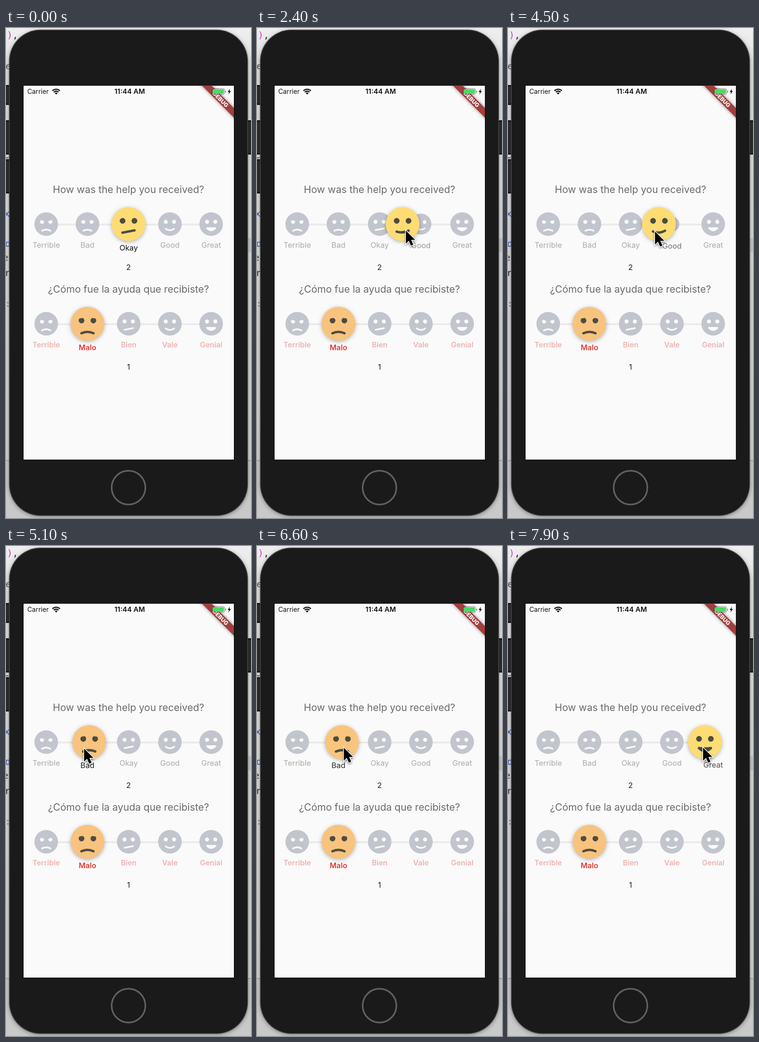
These frames come from a looping animation (530x1057 px, 8000 ms). An HTML page with a canvas:

```html
<!DOCTYPE html>
<html lang="en">
<head>
<meta charset="utf-8">
<title>Review sliders</title>
<style>
html, body { margin: 0; width: 530px; height: 1057px; overflow: hidden; }
canvas { display: block; }
</style>
</head>
<body>
<canvas id="stage" width="530" height="1057"></canvas>
<script>
const ctx = document.getElementById('stage').getContext('2d');
const LOOP = 8000, STEP = 100;
const FIRST = 87, GAP = 89.2;

// time, slider x, pointer x, pointer y
const KEYS = [
  [0, 265, 300, 545], [500, 265, 264, 438], [1300, 91, 89, 438], [1700, 91, 89, 438],
  [2400, 315, 322, 437], [3000, 420, 417, 440], [3500, 422, 418, 441], [3900, 422, 418, 441],
  [5100, 180, 169, 437], [5700, 91, 88, 438], [6000, 91, 89, 437], [6200, 91, 89, 437],
  [7100, 353, 361, 432], [7700, 423, 420, 435], [7900, 426, 422, 435]
];

// mouth: left end, right end, upper and lower control heights; eye: cut centre and half width
const MOODS = [
  { color: [239, 170, 136], mouth: [20.5, 20.5, 13.5, 13.5], cut: [-75, 50] },
  { color: [248, 195, 126], mouth: [20.5, 20.5, 14.5, 14.5], cut: [-100, 35] },
  { color: [254, 220, 116], mouth: [18.5, 13.5, 16, 16], cut: [-100, 0] },
  { color: [254, 220, 116], mouth: [14.5, 14.5, 24, 24], cut: [-100, 0] },
  { color: [254, 220, 116], mouth: [12.5, 12.5, 12.5, 26], cut: [-100, 0] }
];

const slotX = i => FIRST + GAP * i;
const mix = (a, b, f) => a.map((v, i) => v + (b[i] - v) * f);
const rad = deg => deg * Math.PI / 180;

function slope(i, c) {
  const a = KEYS[i], b = KEYS[i + 1];
  return (b[c] - a[c]) / (b[0] - a[0]);
}

function tangent(i, c) {
  if (i === 0 || i === KEYS.length - 1) return 0;
  const p = slope(i - 1, c), q = slope(i, c);
  return p * q > 0 ? 2 * p * q / (p + q) : 0;
}

function track(t, c) {
  let i = 0;
  while (i < KEYS.length - 2 && t >= KEYS[i + 1][0]) i++;
  const a = KEYS[i], b = KEYS[i + 1], h = b[0] - a[0], u = Math.min(1, (t - a[0]) / h);
  const s = u * u * (3 - 2 * u);
  return a[c] + (b[c] - a[c]) * s
    + h * u * (1 - u) * ((1 - u) * tangent(i, c) - u * tangent(i + 1, c));
}

function moodAt(pos) {
  const p = Math.max(0, Math.min(4, pos)), i = Math.min(3, Math.floor(p));
  const a = MOODS[i], b = MOODS[i + 1], f = p - i;
  return {
    color: `rgb(${mix(a.color, b.color, f)})`,
    mouth: mix(a.mouth, b.mouth, f),
    cut: mix(a.cut, b.cut, f)
  };
}

function rect(x, y, w, h, fill, r = 0) {
  ctx.fillStyle = fill;
  ctx.beginPath();
  ctx.roundRect(x, y, w, h, r);
  ctx.fill();
}

function poly(points, fill) {
  ctx.fillStyle = fill;
  ctx.beginPath();
  points.forEach(p => ctx.lineTo(...p));
  ctx.closePath();
  ctx.fill();
}

function disc(x, y, r, fill) {
  ctx.fillStyle = fill;
  ctx.beginPath();
  ctx.arc(x, y, r, 0, 7);
  ctx.fill();
}

function text(str, x, y, size, color, weight = 400, align = 'center', family = 'Inter, sans-serif') {
  ctx.font = `${weight} ${size}px ${family}`;
  ctx.fillStyle = color;
  ctx.textAlign = align;
  ctx.fillText(str, x, y);
}

function shadow(color, blur = 0, dy = 0) {
  ctx.shadowColor = color;
  ctx.shadowBlur = blur;
  ctx.shadowOffsetY = dy;
}
const noShadow = () => shadow('transparent');

function face(x, y, scale, mood, headColor, ink) {
  ctx.save();
  ctx.translate(x, y);
  ctx.scale(scale, scale);
  if (scale === 1) shadow('rgba(0,0,0,.3)', 8, 2);
  disc(0, 0, 36.5, headColor);
  noShadow();

  ctx.fillStyle = ctx.strokeStyle = ink;
  const [centre, half] = mood.cut;
  for (const side of [1, -1]) {
    ctx.save();
    ctx.scale(side, 1);
    ctx.beginPath();
    // the extra 0.1 degree keeps an uncut eye a full circle
    ctx.arc(-12.8, -7, 6.2, rad(centre + half), rad(centre - half + 360.1));
    ctx.fill();
    ctx.restore();
  }

  const [left, right, upper, lower] = mood.mouth;
  ctx.lineWidth = 5.2;
  ctx.lineCap = ctx.lineJoin = 'round';
  ctx.beginPath();
  ctx.moveTo(-13, left);
  ctx.quadraticCurveTo(0, upper, 13, right);
  ctx.quadraticCurveTo(0, lower, -13, left);
  ctx.fill();
  ctx.stroke();
  ctx.restore();
}

function slider(y, x, title, labels, value, style) {
  text(title, 265, y - 73, 21.4, '#6b6b6d');
  rect(FIRST, y - 1, GAP * 4, 4, '#eaeaeb');
  const pos = (x - FIRST) / GAP;
  labels.forEach((label, i) => {
    // a slot shrinks and its label darkens as the head comes near
    const near = Math.max(0, 1 - 2 * Math.abs(pos - i));
    face(slotX(i), y, 0.7 * (1 - near), MOODS[i], '#c2c5cd', '#fafafa');
    ctx.globalAlpha = style.dim + (1 - style.dim) * near;
    text(label, slotX(i), y + 46 + 6 * near, style.size, style.color, style.weight);
    ctx.globalAlpha = 1;
  });
  const mood = moodAt(pos);
  face(x, y, 1, mood, mood.color, '#4c4c40');
  text(value, 265, y + 94.5, 16.5, '#222');
}

function backdrop() {
  const g = ctx.createLinearGradient(0, 0, 0, 930);
  g.addColorStop(0, '#efefef');
  g.addColorStop(0.1, '#dedede');
  g.addColorStop(1, '#d2d2d2');
  rect(0, 0, 530, 1057, g);
  rect(523, 453, 7, 31, '#c6c6c8');
  rect(0, 933, 530, 124, '#c9c9c9');
  rect(0, 932, 530, 2, '#a5a5a5');
  const code = (s, x, y, color) => text(s, x, y, 20, color, 400, 'left', '"DejaVu Sans Mono", monospace');
  code(')', 2, 17, '#d238c4');
  code(',', 14, 17, '#222');
  code('e', -1, 84, '#555');
  code('c', -5, 276, '#333');
  code('x', -4, 402, '#3c50b4');
  code('d', -2, 467, '#3c50b4');
  code('e', -7, 497, '#333');
  code('r', -3, 530, '#333');
  code(':', -2, 596, '#777');
}

function phone() {
  for (const [x, y, h] of [[-2, 123, 43], [-2, 199, 74], [-2, 283, 74], [520, 199, 74]]) {
    rect(x, y, 12, h, '#151515', 3);
    rect(x + 1, y + 3, 10, h - 6, '#2c2c2c', 2);
  }
  shadow('rgba(0,0,0,.35)', 8, 2);
  rect(6.5, 3.5, 517, 1049, '#4a4a4a', 68);
  noShadow();
  rect(8, 5, 514, 1046, '#1a1a1a', 67);
  rect(37, 123, 457, 809, '#080808');
  rect(38, 124.5, 455, 806.5, '#fafafa');
  ctx.strokeStyle = '#606060';
  ctx.lineWidth = 3.5;
  ctx.beginPath();
  ctx.arc(265, 991.5, 36.5, 0, 7);
  ctx.stroke();
}

function ribbon() {
  ctx.save();
  ctx.beginPath();
  ctx.rect(38, 124.5, 455, 806.5);
  ctx.clip();
  ctx.translate(464, 154);
  ctx.rotate(Math.PI / 4);
  shadow('rgba(0,0,0,.5)', 7);
  rect(-80, -7.3, 160, 14.6, '#a43d3d');
  noShadow();
  text('DEBUG', 0, 0.5, 12.2, '#fff', 800);
  ctx.restore();
}

function statusBar() {
  text('Carrier', 46, 137.5, 14.2, '#111', 400, 'left');
  text('11:44 AM', 267.5, 137.5, 15, '#111', 600);

  ctx.save();
  ctx.beginPath();
  ctx.moveTo(108.5, 143.5);
  ctx.arc(108.5, 143.5, 12.8, rad(-135), rad(-45));
  ctx.clip();
  disc(108.5, 143.5, 4.2, '#111');
  ctx.strokeStyle = '#111';
  ctx.lineWidth = 2.5;
  for (const r of [7.2, 11.4]) {
    ctx.beginPath();
    ctx.arc(108.5, 143.5, r, 0, 7);
    ctx.stroke();
  }
  ctx.restore();

  ctx.strokeStyle = 'rgba(70,60,60,.6)';
  ctx.lineWidth = 1;
  ctx.beginPath();
  ctx.roundRect(445.5, 130.5, 27.5, 13, 3.5);
  ctx.stroke();
  rect(447, 132, 24.5, 10, '#4cd964', 2);
  rect(474.3, 135, 1.7, 4.5, 'rgba(70,60,60,.6)', 1);
  poly([[484.5, 131], [479.5, 138], [482.5, 138], [481, 143.5], [486.5, 136], [483.5, 136]], '#111');
}

function pointer(x, y) {
  ctx.save();
  ctx.translate(x, y);
  const shape = [[0, 0], [0, 28], [6.4, 22], [11, 32.5], [16, 30.2], [11.5, 20], [20, 20]];
  shadow('rgba(0,0,0,.35)', 4, 2);
  ctx.strokeStyle = '#fff';
  ctx.lineWidth = 3;
  poly(shape, '#fff');
  ctx.stroke();
  noShadow();
  poly(shape, '#000');
  ctx.restore();
}

function draw(t) {
  backdrop();
  phone();
  ribbon();
  statusBar();
  slider(423, track(t, 1), 'How was the help you received?',
    ['Terrible', 'Bad', 'Okay', 'Good', 'Great'], '2',
    { color: '#111', dim: 0.34, size: 16.5, weight: 400 });
  slider(638, slotX(1), '¿Cómo fue la ayuda que recibiste?',
    ['Terrible', 'Malo', 'Bien', 'Vale', 'Genial'], '1',
    { color: '#dc3a34', dim: 0.37, size: 16, weight: 600 });
  if (t >= STEP) pointer(track(t, 2), track(t, 3));
}

ctx.textBaseline = 'middle';
const start = performance.now();
function frame() {
  const t = (performance.now() - start) % LOOP;
  draw(Math.floor(t / STEP) * STEP);
  requestAnimationFrame(frame);
}
frame();
</script>
</body>
</html>
```
